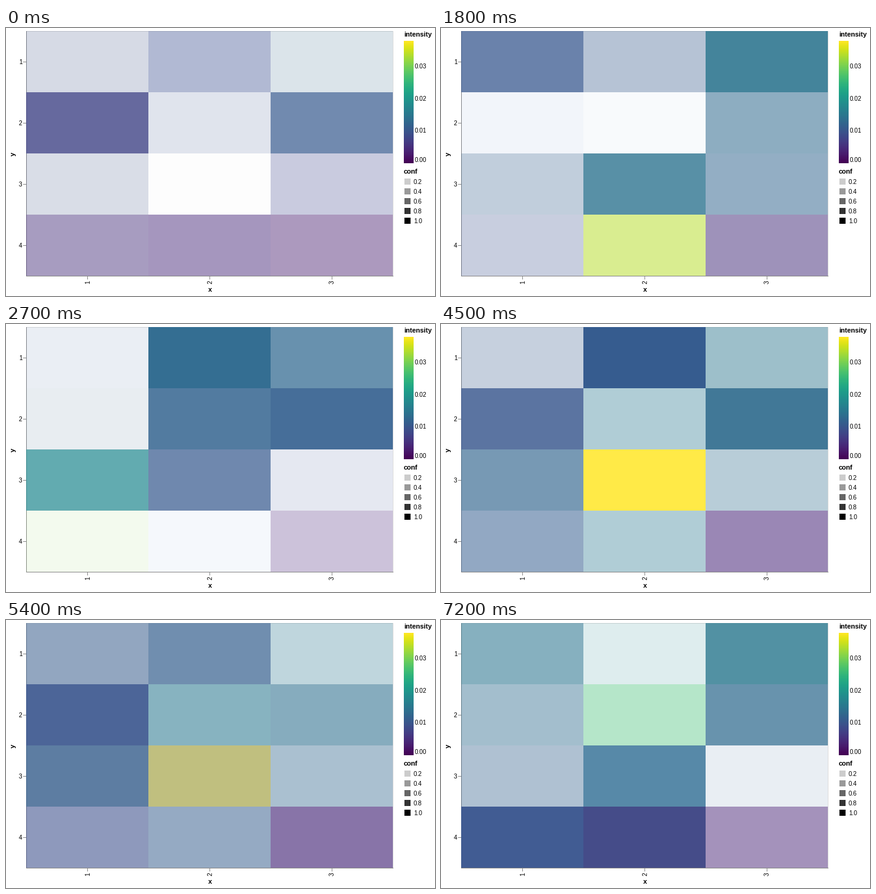
These frames come from a looping animation (702x438 px, 8 s). A matplotlib script:

```python
import numpy as np
import matplotlib.pyplot as plt
from matplotlib.animation import FuncAnimation
from matplotlib.colors import to_rgb
from matplotlib.patches import Rectangle

W, H, DPI = 702, 438, 64
X0, Y0, CELL_W, CELL_H = 33, 5, 200, 100
COLS, ROWS = 3, 4
TICK_MS, STEP_MS, LOOP_MS = 100, 900, 8000
AXIS, BORDER = "#888888", "#dddddd"

# Cell colours of each step, row by row; an empty step blends its neighbours.
STEPS = [
    "d6dae5 b1b9d3 dce5eb 66699e e1e5ee 718aaf dadde8 fdfdfd c9cbdf a89dc1 a596be ac99bf",
    "",
    "6a82ab b7c4d6 44849b f2f5fa f9fbfd 8dadc1 c1cedc 5891a7 94afc5 c8cedf d9ee90 9e92ba",
    "ebeff5 346d91 6891ae e9eef2 527ba0 466f99 62abb0 6f88af e6e9f2 f4fbef f6f9fd ccc2da",
    "",
    "c7d1de 365c90 9ec0cb 5b74a1 b1ced7 417897 7799b4 ffeb47 b9cdd9 93a8c4 b0cdd6 9a88b5",
    "",
    "5e7da4 aac0cf e1eef0 3d568f 5e99a9 cbe0e4 426291 8295b7 9bb4c8 8b8bb5 7a88b0 76619b",
    "86b0bf dfeeef 5291a3 a3bfce b5e6c9 6893ae afc1d2 5789a8 e9eef3 415c93 454c89 a492bb",
]

VIRIDIS = plt.get_cmap("viridis")(np.linspace(0, 1, 256))[:, :3]


def unblend(rgb):
    """Split a colour seen on white into a viridis-like colour and its opacity."""
    shade, lut = 1 - rgb, 1 - VIRIDIS
    alpha = np.clip(lut @ shade / (lut ** 2).sum(axis=1), 0.004, 1)
    error = ((alpha[:, None] * lut - shade) ** 2).sum(axis=1)
    a = alpha[error.argmin()]
    return (*np.clip(1 - shade / a, 0, 1), a)


def build_steps():
    steps = [np.array([to_rgb("#" + c) for c in s.split()]) for s in STEPS]
    for i, step in enumerate(steps):
        if not len(step):
            steps[i] = (steps[i - 1] + steps[i + 1]) / 2
    return [[unblend(rgb) for rgb in step] for step in steps]


plt.rcParams["font.family"] = "Liberation Sans"
fig = plt.figure(figsize=(W / DPI, H / DPI), dpi=DPI, facecolor="white")
ax = fig.add_axes([0, 0, 1, 1])


def box(x, y, w, h, color, z=1):
    patch = Rectangle((x, y), w, h, facecolor=color, linewidth=0,
                      antialiased=False, zorder=z)
    return ax.add_patch(patch)


def label(x, y, text, px=10, **kw):
    ax.text(x, y, text, fontsize=px * 72 / DPI, color="black",
            va="baseline", rotation_mode="anchor", **kw)


def title(x, y, text, **kw):
    label(x, y, text, px=11, weight="bold", **kw)


def draw_axes():
    w, h = COLS * CELL_W, ROWS * CELL_H
    box(X0, Y0, w + 1, 1, BORDER)
    box(X0 + w, Y0, 1, h + 1, BORDER)
    box(X0, Y0, 1, h + 1, AXIS)
    box(X0, Y0 + h, w + 1, 1, AXIS)
    for r in range(ROWS):
        y = Y0 + CELL_H * r + CELL_H // 2
        box(X0 - 5, y, 5, 1, AXIS)
        label(26.5, y + 4, str(r + 1), ha="right")
    for c in range(COLS):
        x = X0 + CELL_W * c + CELL_W // 2
        box(x, Y0 + h + 1, 1, 5, AXIS)
        label(x + 4, 412, str(c + 1), ha="right", rotation=90)
    title(333.5, 431, "x", ha="center")
    title(15, 206, "y", ha="center", rotation=90)


def draw_legends():
    title(651, 14, "intensity")
    ramp = np.linspace(1, 0, 200)[:, None]
    ax.imshow(ramp, cmap="viridis", extent=(651, 667, 221, 21),
              aspect="auto", interpolation="nearest")
    for text, y in (("0.03", 66), ("0.02", 119), ("0.01", 171), ("0.00", 219)):
        label(669, y, text)

    title(651, 238, "conf")
    for i in range(5):
        conf, y = (i + 1) / 5, 246 + 16 * i
        box(652, y, 10, 10, (0, 0, 0, conf))
        label(667, y + 9, f"{conf:.1f}")


draw_axes()
draw_legends()
ax.set_xlim(0, W)
ax.set_ylim(H, 0)
ax.axis("off")

cells = [box(X0 + c * CELL_W, Y0 + r * CELL_H, CELL_W, CELL_H, "white", z=3)
         for r in range(ROWS) for c in range(COLS)]
fills = build_steps()


def update(frame):
    step = min(frame * TICK_MS // STEP_MS, len(fills) - 1)
    for cell, rgba in zip(cells, fills[step]):
        cell.set_facecolor(rgba)
    return cells


anim = FuncAnimation(fig, update, frames=LOOP_MS // TICK_MS, interval=TICK_MS,
                     init_func=lambda: update(0), repeat=True, repeat_delay=0)
plt.show()
```
